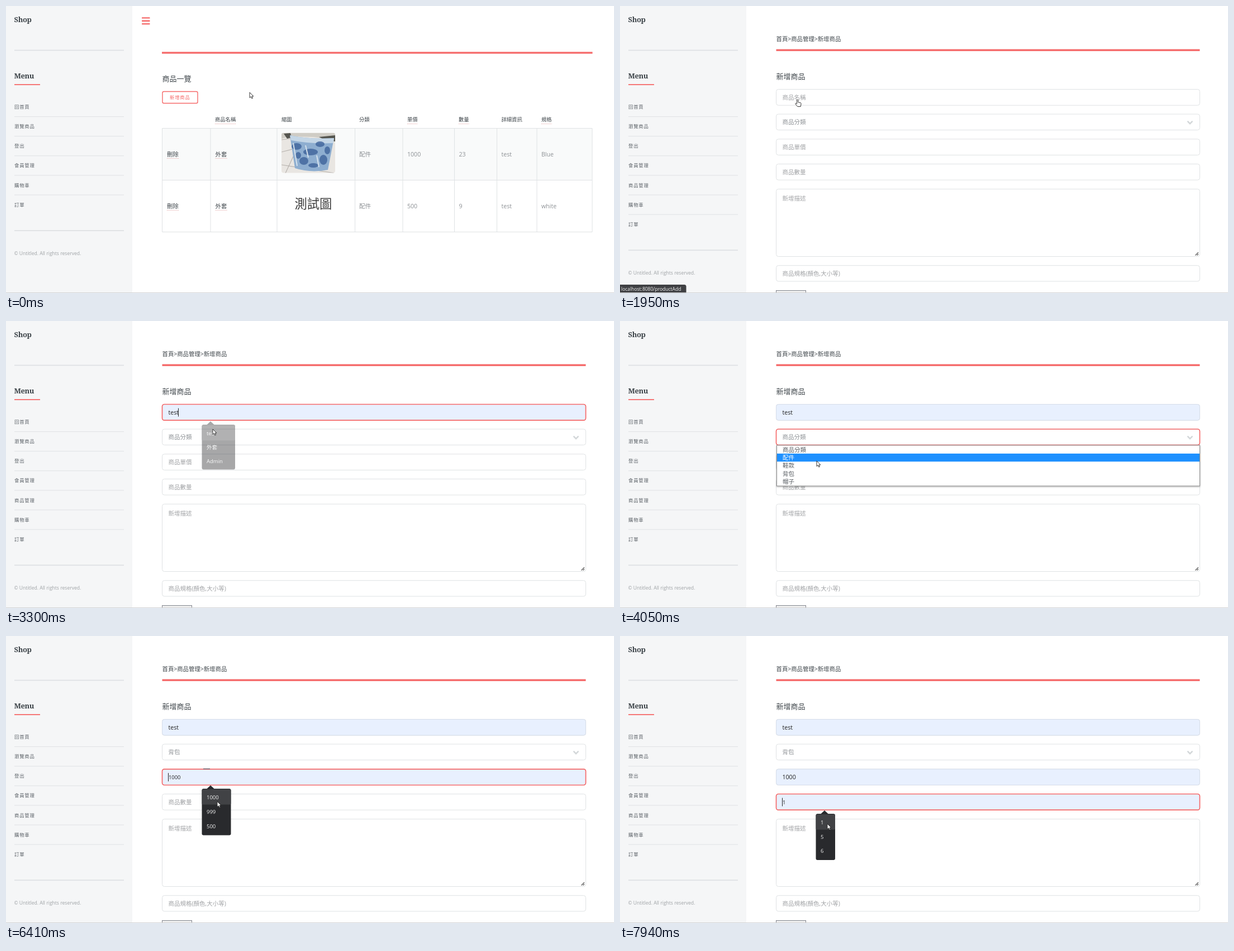
Write an HTML page that moves like this. It is 1088 px wide and 515 px high and loops after 8 s.

```html
<!DOCTYPE html>
<html lang="zh-Hant">
<head>
<meta charset="utf-8">
<title>Shop</title>
<style>
html, body { margin: 0; width: 100%; height: 100%; overflow: hidden; background: #fff; }
svg { display: block; width: 1088px; height: 515px; }
text { font-family: "Open Sans", "Noto Sans CJK TC", "Noto Sans CJK", sans-serif; white-space: pre; }
.slab { font-family: "Noto Serif", serif; font-weight: 700; letter-spacing: -.4px; }
.caps { letter-spacing: .8px; }
.mid { font-weight: 500; }
</style>
</head>
<body>
<svg id="stage" viewBox="0 0 1088 515" xmlns="http://www.w3.org/2000/svg"></svg>
<script>
const LOOP = 8000, PAGE = 1540, FADE = 170;
const RED = '#f56a6a', DARK = '#3d4449', GRAY = '#8d9195', HINT = '#a0a2a5', LINE = '#dfe2e4';
const ROW_TOP = 223.5, ROW_H = 14.4;

// Text is placed by its left edge and vertical middle.
const text = (x, y, s, size, fill, cls = '') =>
  `<text x="${x}" y="${y + size * .37}" font-size="${size}" fill="${fill}" class="${cls}">${s}</text>`;
const rect = (x1, y1, x2, y2, fill, extra = '') =>
  `<rect x="${x1}" y="${y1}" width="${x2 - x1}" height="${y2 - y1}" fill="${fill}" ${extra}/>`;
const path = (d, extra) => `<path d="${d}" ${extra}/>`;
const during = (from, to, body, extra = '') =>
  `<g data-from="${from}" data-to="${to}" ${extra}>${body}</g>`;
const dots = (x1, x2, y) =>
  path(`M${x1} ${y}H${x2}`, 'stroke="#e3a3a3" stroke-dasharray="1 1"');
const caret = (x, y) => rect(x, y - 7.5, x + 1, y + 7.5, '#222');

function sidebar(items) {
  const end = 181 + items.length * 35.1;
  let s = rect(0, 0, 226, 515, '#f5f6f7') +
    text(14.5, 24, 'Shop', 13, DARK, 'slab') + rect(15, 78.6, 211, 80.4, '#dfe1e4') +
    text(14.5, 125, 'Menu', 13, DARK, 'slab') + rect(15, 140.2, 61, 142, RED);
  items.forEach((item, i) => {
    const y = 181 + i * 35.1;
    s += text(15, y, item, 8.4, '#5d6369', 'caps');
    if (i) s += rect(15, y - 18, 211, y - 17, LINE);
  });
  return s + rect(15, end + 10.6, 211, end + 12.4, '#dfe1e4') +
    text(14.5, end + 52.5, '© Untitled. All rights reserved.', 8.57, '#9fa3a6');
}

function photo() {
  const blots = [[520, 252, 9, 6], [545, 262, 13, 6], [533, 278, 8, 7], [562, 248, 8, 5],
    [568, 276, 7, 9], [550, 286, 9, 4], [575, 259, 5, 7], [523, 268, 5, 6]];
  return '<clipPath id="frame"><rect x="493" y="227.5" width="96" height="72" rx="4"/></clipPath>' +
    '<g clip-path="url(#frame)">' + rect(493, 227, 589, 300, '#e9e6e2') +
    path('M493 262L512 257M493 285L589 300M500 300L514 270M493 240L509 238', 'stroke="#b7b3ae" stroke-width="1.2"') +
    path('M493 228H589V240L550 235L508 234L493 238Z', 'fill="#cfccc5"') +
    path('M497 229L509 228L511 236L503 238ZM560 235L589 232V243L574 242Z', 'fill="#55554f"') +
    path('M508 232Q545 240 587 237L576 294Q545 300 517 291Z', 'fill="#8eaed0"') +
    path('M508 232Q545 240 587 237L586 246Q545 248 510 241Z', 'fill="#c4d6e6"') +
    blots.map(([x, y, a, b]) => `<ellipse cx="${x}" cy="${y}" rx="${a}" ry="${b}" fill="#3f639b" opacity=".8"/>`).join('') +
    path('M536 250L541 272M556 268L560 289M514 246L521 287', 'stroke="#d4e1ec" stroke-width="2"') + '</g>';
}

function listPage() {
  const cols = [366, 485, 624.5, 710, 802.5, 878.5, 950];
  const heads = [[374, '商品名稱', 1], [493, '縮圖'], [632, '分類'], [718, '單價', 1],
    [810, '數量', 1], [886.5, '詳細資訊'], [958, '規格', 1]];
  const rows = [[266, '1000', '23', 'Blue'], [359, '500', '9', 'white']];
  let s = sidebar(['回首頁', '瀏覽商品', '登出', '會員管理', '購物車', '訂單']);
  for (const y of [20.3, 25.6, 30.9]) s += rect(243, y, 257.5, y + 2.3, RED, 'rx=".6"');
  s += rect(279, 82.3, 1049.5, 85.6, RED) + text(279.5, 130, '商品一覽', 13, DARK, 'mid') +
    rect(280, 153.5, 343, 174.5, 'none', `rx="2.5" stroke="${RED}" stroke-width="1.4"`) +
    during(730, PAGE, rect(280, 153.5, 343, 174.5, RED, 'rx="2.5" opacity=".06"')) +
    text(293, 164, '新增商品', 8.4, RED, 'caps mid');
  for (const [x, label, link] of heads)
    s += text(x, 204, label, 9.3, DARK, 'mid') + (link ? dots(x, x + label.length * 9.3, 211.5) : '');
  s += rect(279.5, 219.5, 1049, 312.5, '#f9fafa');
  s += path('M279.5 219.5H1049V405.5H279.5ZM279.5 312.5H1049' + cols.map(x => `M${x} 219.5V405.5`).join(''),
    `fill="none" stroke="${LINE}"`);
  for (const [y, price, count, spec] of rows) {
    s += text(288, y, '刪除', 10.4, DARK) + dots(288, 309, y + 7.5) +
      text(374.5, y, '外套', 10.4, DARK) + dots(374.5, 395.5, y + 7.5);
    [[632, '配件'], [718, price], [810.5, count], [886.5, 'test'], [958, spec]]
      .forEach(([x, v]) => s += text(x, y, v, 10.6, GRAY));
  }
  return s + photo() + text(516.5, 354.5, '測試圖', 22.3, '#3a3a3a');
}

const box = (y1, y2, fill = '#fff', stroke = LINE, w = 1) =>
  rect(279.5, y1, 1037.5, y2, fill, `rx="4" stroke="${stroke}" stroke-width="${w}"`);

// A text input: hint, then a previewed suggestion, then the chosen value.
function field(y, hint, value, focus, hover, chosen, blur, tail) {
  const top = y - 14.5, bottom = y + 14.2;
  return box(top, bottom) +
    during(hover, LOOP, box(top, bottom, '#e8f0fe', '#d5dce8')) +
    during(focus, blur, box(top, bottom, 'none', RED, 1.7)) +
    during(PAGE, hover, text(290.5, y, hint, 10.5, HINT)) +
    during(hover, chosen, text(291, y + .5, value, 9.4, '#222')) +
    during(chosen, LOOP, text(290.5, y, value, 10.6, '#222')) +
    during(focus, chosen, caret(290, y)) +
    (tail ? during(chosen, tail[1], caret(tail[0], y)) : '');
}

function popup(y, right, pitch, items, from, hover, to) {
  const h = pitch * 3 + 5.5;
  return during(from, to,
    path(`M359 ${y + .5}L366 ${y - 6}L373 ${y + .5}Z`, 'fill="#292a2d"') +
    rect(350.5, y, right, y + h, '#292a2d', 'rx="3"') +
    during(hover, LOOP, rect(350.5, y + 1, right, y + 28.5, '#414245', 'rx="2"')) +
    items.map((v, i) => text(359, y + 15.2 + i * pitch, v, 9.5, '#f2f2f2')).join(''), 'data-fade');
}

function dropdown() {
  const names = ['商品分類', '配件', '鞋款', '背包', '帽子'];
  return during(3860, 5060,
    rect(280.5, 223, 1037.5, 296, '#fff', 'stroke="#8b8b8b" filter="url(#shade)"') +
    `<rect id="pick" x="281" width="756" height="${ROW_H}" fill="#1e90ff"/>` +
    names.map((v, i) => text(291, ROW_TOP + 7.2 + i * ROW_H, v, 10.5, '#565b60', 'option')).join(''));
}

function formPage() {
  return sidebar(['回首頁', '瀏覽商品', '登出', '會員管理', '商品管理', '購物車', '訂單']) +
    text(279.5, 59, '首頁&gt;商品管理&gt;新增商品', 10.4, DARK) + rect(279.5, 77.5, 1037.5, 80.9, RED) +
    text(279.5, 126, '新增商品', 13, DARK, 'mid') +
    field(164, '商品名稱', 'test', 2700, 3050, 3230, 3790, [308, 3790]) +
    box(194, 222.5) + during(3790, 5600, box(194, 222.5, 'none', RED, 1.7)) +
    during(PAGE, 5060, text(290.5, 208.3, '商品分類', 10.5, GRAY)) +
    during(5060, LOOP, text(290.5, 208.3, '背包', 10.5, GRAY)) +
    path('M1015.5 206.7L1020 211.2L1024.5 206.7', 'fill="none" stroke="#d3d7d9" stroke-width="2.4"') +
    field(253.3, '商品單價', '1000', 5600, 5870, 6470, 7410, [314, 7080]) +
    during(5600, 7410, rect(353, 237.8, 365, 238.8, '#3f4a5a')) +
    field(298, '商品數量', '1', 7410, 7850, LOOP, LOOP) +
    box(328.5, 449.5) + text(290.5, 345.5, '新增描述', 10.5, HINT) +
    path('M1029.5 447.5L1035 442M1032.5 447.5L1035 445', 'stroke="#555" stroke-width="1.1"') +
    box(465.7, 494) + text(290.5, 480, '商品規格(顏色,大小等)', 10.5, HINT) +
    rect(279.5, 510.5, 332.5, 520, '#efefef', 'stroke="#81858d"') +
    popup(186, 410, 25, ['test', '外套', 'Admin'], 2760, 3050, 3370) +
    popup(274, 402.5, 26, ['1000', '999', '500'], 5660, 5870, 6640) +
    popup(319, 385, 25.8, ['1', '5', '6'], 7480, 7850, LOOP + FADE) + dropdown();
}

const pointers = {
  arrow: path('M0 0V9.6L2.3 7.6L3.9 11L5.5 10.3L4 7H6.9Z', 'fill="#fff" stroke="#222" stroke-width=".9"'),
  hand: path('M-1 7V1Q0 -.8 1.2 1V5.2L5.6 6.2Q6.7 6.6 6.5 8L5.6 13H.2L-3.6 8.4Q-3.6 6.6 -2.2 7L-1 8.2Z',
    'fill="#fff" stroke="#222" stroke-width=".9"'),
  beam: path('M-2.5 -6H2.5M0 -6V6M-2.5 6H2.5', 'fill="none" stroke="#333" stroke-width="1"')
};
// time, x, y
const track = [[0, 436, 155], [70, 436, 155], [500, 372, 160], [860, 327, 166], [930, 326, 166],
  [1210, 317.5, 167.5], [1950, 317.5, 167.5], [2420, 348, 165], [2760, 348, 165], [3160, 370, 194],
  [3450, 370, 194], [3520, 380, 196], [3860, 380, 196], [4050, 352, 251], [4270, 335, 277],
  [5330, 335, 277], [5520, 350, 255], [5660, 350, 255], [6130, 378, 297], [6540, 378, 297],
  [6870, 372, 299], [7700, 372, 299], [7940, 371, 337], [LOOP, 371, 337]];
// time from which each pointer shape holds
const shapes = [[0, 'arrow'], [730, 'hand'], [2010, 'beam'], [2960, 'arrow'], [5420, 'beam'],
  [5800, 'arrow'], [6640, 'beam'], [7780, 'arrow']];
const clicks = [[1080, 1210], [2630, 2760], [3170, 3300], [3790, 3860], [4930, 5060],
  [5530, 5660], [6430, 6540], [7410, 7540]];

const stage = document.getElementById('stage');
stage.innerHTML =
  '<defs><filter id="shade" x="-2%" y="-10%" width="104%" height="125%">' +
  '<feDropShadow dx="0" dy="1" stdDeviation="1.5" flood-opacity=".35"/></filter></defs>' +
  rect(0, 0, 1088, 515, '#fff') +
  during(0, PAGE, listPage()) + during(PAGE, LOOP, formPage()) +
  during(930, 2010, path('M0 500H115Q118.5 500 118.5 503.5V515H0Z', 'fill="#3f4043"') +
    text(2, 508, 'localhost:8080/productAdd', 8.5, '#f4f4f4')) +
  rect(0, 514, 1088, 515, '#d2d3d4') +
  '<g id="cursor">' +
  clicks.map(([a, b]) => during(a, b, '<circle cx="-.5" r="9" fill="#f5ec32" opacity=".72"/>')).join('') +
  shapes.map(([a, name], i) => during(a, i + 1 < shapes.length ? shapes[i + 1][0] : LOOP, pointers[name])).join('') +
  '</g>';

const cursor = document.getElementById('cursor'), pick = document.getElementById('pick');
const options = [...document.querySelectorAll('.option')];
const timed = [...stage.querySelectorAll('[data-from]')].map(el =>
  ({ el, from: +el.dataset.from, to: +el.dataset.to, fade: 'fade' in el.dataset }));

function cursorAt(t) {
  const i = track.findIndex(k => k[0] > t);
  const [t0, x0, y0] = track[i - 1], [t1, x1, y1] = track[i];
  const p = (t - t0) / (t1 - t0);
  return [x0 + (x1 - x0) * p, y0 + (y1 - y0) * p];
}

function draw(t) {
  for (const { el, from, to, fade } of timed) {
    el.style.display = t >= from && t < to ? '' : 'none';
    if (fade) el.style.opacity = Math.min(1, Math.max(0, (to - t) / FADE));
  }
  const [x, y] = cursorAt(t);
  cursor.setAttribute('transform', `translate(${x} ${y})`);
  const row = Math.min(4, Math.max(0, Math.floor((y - ROW_TOP) / ROW_H)));
  pick.setAttribute('y', ROW_TOP + row * ROW_H);
  options.forEach((o, i) => o.setAttribute('fill', i === row ? '#fff' : '#565b60'));
}

const start = performance.now();
(function tick() {
  draw((performance.now() - start) % LOOP);
  requestAnimationFrame(tick);
})();
</script>
</body>
</html>
```
